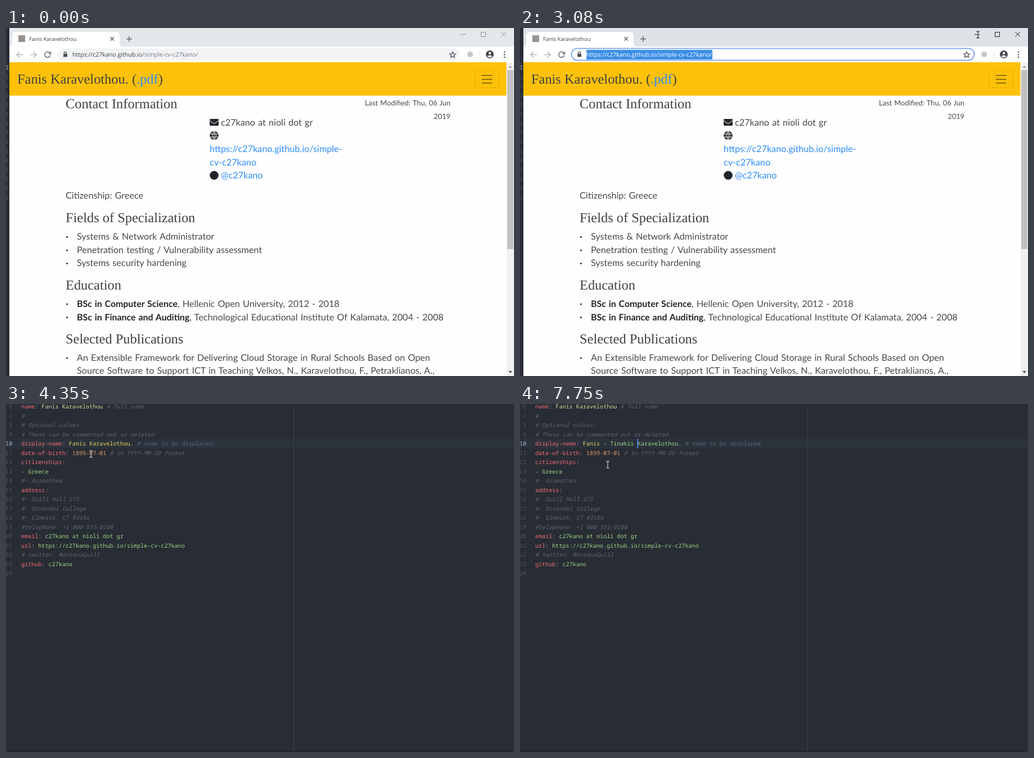
Animation, 903 px wide and 620 px high, one loop 8000 ms. Source, as an HTML page:

```html
<!DOCTYPE html>
<html lang="en">
<head>
<meta charset="utf-8">
<title>Editing a CV</title>
<style>
html, body { margin: 0; width: 100%; height: 100%; overflow: hidden; background: #282c34; }
svg { display: block; width: 903px; height: 620px; }
text { white-space: pre; text-rendering: geometricPrecision; }
.mono { font: 10.1px "Noto Sans Mono", "DejaVu Sans Mono", monospace; fill: #abb2bf; }
.num { fill: #4b5263; text-anchor: end; }
.num.on { fill: #a5acba; }
.key { fill: #f26a72; }
.str { fill: #98d67f; }
.pale { fill: #d9dd9c; }
.gold { fill: #e0d35c; }
.date { fill: #dc9c66; }
.note { fill: #5c6370; font-style: italic; }
.item { fill: #50535a; }
.item .hit { fill: #16181c; font-weight: 700; }
.ui { font: 10.6px "Open Sans", "Noto Sans", sans-serif; fill: #3c4043; }
.body { font: 16.2px Lato, "Open Sans", sans-serif; word-spacing: 1px; fill: #45494d; }
.small { font-size: 12.8px; text-anchor: end; }
.bold { font-size: 15.9px; font-weight: 700; fill: #212529; }
.link { fill: #2f8df8; }
.head { font: 24.4px "Liberation Serif", "Noto Serif", serif; fill: #3d4145; }
.bar { fill: #e5e8eb; }
.focus .bar { fill: #dee1e6; }
.btn { stroke: #8c8f93; fill: none; }
.focus .btn { stroke: #16181c; }
.pill { fill: #f1f3f4; }
.focus .pill { fill: #fff; stroke: #86aef0; stroke-width: 2; }
.sel { display: none; fill: #3a8ee6; }
.focus .sel { display: inline; }
.path { fill: #777b80; }
.focus .url, .focus .path { fill: #fff; }
.icon { fill: none; stroke: #5f6368; stroke-width: 1.5; }
.pale-icon { stroke: #b4b7bb; }
</style>
</head>
<body>
<svg viewBox="0 0 903 620">
  <rect width="903" height="620" fill="#282c34"/>
  <rect y="62" width="903" height="17" fill="#2c323c"/>
  <path d="M511.5 0V620" stroke="#3b4048"/>
  <rect y="618" width="903" height="2" fill="#2a222e"/>
  <g id="code" class="mono"></g>
  <rect id="caret" y="62" width="1.6" height="17" fill="#528bff"/>

  <g id="win">
    <rect class="bar" x="6" width="897" height="34"/>
    <path d="M6 33Q11 33 11 28V14Q11 7 18 7H195Q202 7 202 14V28Q202 33 207 33H903V62H6Z" fill="#fff"/>
    <rect x="22" y="13" width="12" height="12" fill="#9a938d"/>
    <path class="icon" d="M185.500 16l6.500 6.500m0-6.500l-6.500 6.500M214 19.500h10m-5-5v10"/>
    <path class="btn" d="M808 11.500h9M844.500 7.500h8v8h-8zM880.500 7l8.500 8.500m0-8.500l-8.500 8.500"/>
    <path class="icon pale-icon" d="M30 47.500H19m5-5l-5 5 5 5M43 47.500h11m-5-5l5 5-5 5"/>
    <path class="icon" d="M78 44.500a5 5 0 1 0 .8 4M79.500 42v4h-4"/>
    <rect class="pill" x="91.500" y="36.500" width="716" height="21" rx="10.500"/>
    <rect x="102" y="46" width="7" height="5.500" fill="#4c5054"/>
    <path class="icon" d="M103.500 46v-1.500a2 2 0 0 1 4 0V46" stroke-width="1.200"/>
    <rect class="sel" x="118" y="39" width="224" height="17"/>
    <path class="icon" d="M794 42.500l1.500 3.400 3.600.3-2.700 2.500.8 3.600-3.200-1.900-3.200 1.900.8-3.600-2.700-2.500 3.600-.3z" stroke-width="1.200"/>
    <circle cx="825" cy="47" r="5" fill="#c4c6c9"/>
    <path d="M842.500 41v13" stroke="#dcdee1"/>
    <circle cx="860" cy="47" r="7" fill="#45494e"/>
    <circle cx="860" cy="44.700" r="2.200" fill="#fff"/>
    <path d="M855.500 50.500q4.500-4 9 0-4.500 4-9 0" fill="#fff"/>
    <path d="M886 43v.01M886 47.500v.01M886 52v.01" stroke="#4c5054" stroke-width="2.600" stroke-linecap="round"/>

    <rect x="6" y="61" width="897" height="559" fill="#fefefe"/>
    <rect x="6" y="61" width="883.500" height="59.500" fill="#ffc107"/>
    <rect x="833.500" y="76" width="43" height="30.500" rx="4" fill="none" stroke="#e6ae06"/>
    <path d="M845.500 84.500H864.500M845.500 91.500H864.500M845.500 98H864.500" stroke="#6b5411" stroke-width="1.400"/>
    <rect x="890" y="62" width="13" height="558" fill="#f1f1f1"/>
    <rect x="891" y="75" width="11" height="319" fill="#c1c1c1"/>
    <path d="M893 71l3.500-4 3.500 4z" fill="#a3a3a3"/>
    <path d="M893 611l3.500 4 3.500-4z" fill="#505050"/>
    <rect x="362" y="162" width="16" height="12" rx="1.500" fill="#212529"/>
    <path d="M362 165l8 5.500 8-5.500" fill="none" stroke="#fefefe"/>
    <circle cx="370" cy="191.500" r="7.800" fill="#212529"/>
    <path d="M362 188.800h16M362 194.200h16M370 183.500v16M370 183.500q-7 8 0 16M370 183.500q7 8 0 16" fill="none" stroke="#fefefe" stroke-width=".9"/>
    <circle cx="370" cy="262.500" r="7.800" fill="#212529"/>
    <g id="page"></g>
  </g>

  <path id="arrow" d="M0 0V12.500L3 10 5 14.500 7 13.600 5 9.300H9Z" fill="#fff" stroke="#222" stroke-width=".9"/>
  <path id="beam" d="M-3-6H-1L0-5 1-6H3M0-5V5M-3 6H-1L0 5 1 6H3" fill="none" stroke="#fff" stroke-width="1.200" style="mix-blend-mode:difference"/>

  <g id="popup" class="mono">
    <rect id="list" x="153" y="79" width="192" rx="2" fill="#dfe1e5"/>
    <path d="M155 79H343q2 0 2 2V101H153V81q0-2 2-2" fill="#c5c9d1"/>
  </g>
</svg>
<script>
const $ = id => document.getElementById(id);
const show = (node, on) => node.style.display = on ? "" : "none";

function add(parent, tag, cls, attrs = {}, content = "") {
  const node = document.createElementNS("http://www.w3.org/2000/svg", tag);
  node.setAttribute("class", cls);
  for (const name in attrs) node.setAttribute(name, attrs[name]);
  node.textContent = content;
  parent.append(node);
  return node;
}

// Runs are [class, text] pairs set one after another.
function write(parent, cls, x, y, ...runs) {
  const line = add(parent, "text", cls, { x, y });
  return runs.map(([c, s]) => add(line, "tspan", c, {}, s));
}

/* Editor */
const name = "Fanis Karavelothou", user = "c27kano";
const site = `https://${user}.github.io/simple-cv-${user}`;
const field = (key, cls, value, note = "") =>
  [["key", key], ["", ": "], [cls, value], ["note", note]];
const note = s => [["note", s]];
const lines = [
  field("name", "pale", name, " # full name"),
  note("#"),
  note("# Optional values:"),
  note("# These can be commented out or deleted."),
  [["key", "display-name"], ["", ": "], ["gold", "Fanis "], ["str", ""],
    ["gold", "Karavelothou."], ["note", " # name to be displayed."]],
  field("date-of-birth", "date", "1899-07-01", " # in YYYY-MM-DD format"),
  field("citizenships", "", ""),
  [["", "- "], ["str", "Greece"]],
  note("#- Aramathea"),
  field("address", "", ""),
  note("#- Quill Hall 275"),
  note("#- Orvendel College"),
  note("#- Elmwick, CT 0318x"),
  note("#telephone: +1 000 555-0100"),
  field("email", "str", user + " at nioli dot gr"),
  field("url", "str", site),
  note("# twitter: MontanaQuill"),
  field("github", "str", user),
  []
];
const rows = lines.map((runs, i) => {
  const y = 8 + i * 16.52;
  write($("code"), i == 4 ? "num on" : "num", 11.3, y, ["", i + 6]);
  return write($("code"), "", 27, y, ...runs);
});
const typedRun = rows[4][3], restRun = rows[4][4];

const suggestions = ["information", "Optional"].map((word, i) => {
  const left = { i: 1, o: 1, a: 1 };
  const runs = [...word].map(c => [left[c]-- > 0 ? "hit" : "", c]);
  return write($("popup"), "item", 160, 93 + 22 * i, ...runs)[0].parentNode;
});

/* Browser page */
const page = $("page");
const put = (cls, x, y, s) => write(page, cls, x, y, ["", s]);
put("ui", 41, 23, name)[0].style.fontSize = "9.5px";
write(page, "ui", 118, 51, ["url", `https://${user}.github.io`], ["path", `/simple-cv-${user}/`]);
write(page, "head", 20, 99, ["", name + ". ("], ["link", ".pdf"], ["", ")"]);

for (const [y, s] of [[143, "Contact Information"], [346, "Fields of Specialization"],
  [466, "Education"], [562, "Selected Publications"]]) put("head", 106, y, s);

put("body small", 790, 138, "Last Modified: Thu, 06 Jun");
put("body small", 790, 162, "2019");
put("body", 382, 174, user + " at nioli dot gr");
put("body link", 362, 221, `https://${user}.github.io/simple-`);
put("body link", 362, 245, "cv-" + user);
put("body link", 382, 268, "@" + user);
put("body", 106, 304, "Citizenship: Greece");

for (const [y, s] of [[377, "Systems & Network Administrator"],
  [400.500, "Penetration testing / Vulnerability assessment"],
  [424, "Systems security hardening"],
  [592.500, "An Extensible Framework for Delivering Cloud Storage in Rural Schools Based on Open"],
  [616, "Source Software to Support ICT in Teaching Velkos, N., Karavelothou, F., Petraklianos, A.,"]
]) put("body", 126, y, s);
for (const [y, degree, rest] of [
  [497, "BSc in Computer Science", ", Hellenic Open University, 2012 - 2018"],
  [520.500, "BSc in Finance and Auditing", ", Technological Educational Institute Of Kalamata, 2004 - 2008"]
]) write(page, "body", 126, y, ["bold", degree], ["", rest]);
for (const y of [372.500, 396, 419.500, 492, 515.500, 588])
  add(page, "circle", "", { cx: 108.500, cy: y, r: 1.5, fill: "#212529" });

/* Motion: [time, x, y] */
const arrowPath = [[450, 794, 577], [600, 783, 524], [800, 783, 524], [900, 778, 470],
  [1050, 790, 350], [1190, 829, 215], [1300, 823, 193], [1660, 823, 193],
  [1800, 820, 125], [1960, 804, 35], [2090, 811, 11]];
const beamPath = [[3400, 814, 12], [3600, 660, 110], [3760, 400, 260], [3870, 220, 321],
  [3960, 135, 270], [4080, 130, 150], [4190, 151, 72], [4350, 151, 89], [4450, 151, 89],
  [4570, 153, 89], [7480, 153, 89], [7750, 156, 108]];
const typed = "- Tinakis ";
const keyTimes = [5050, 5270, 5590, 5750, 5970, 6060, 6210, 6310, 6470, 7050];
const within = (t, a, b) => t >= a && t < b;

function move(node, path, t) {
  const i = path.findIndex(p => p[0] > t);
  const b = path.at(i), a = i > 0 ? path[i - 1] : b;
  const k = a === b ? 0 : (t - a[0]) / (b[0] - a[0]);
  node.setAttribute("transform",
    `translate(${a[1] + (b[1] - a[1]) * k} ${a[2] + (b[2] - a[2]) * k})`);
}

function draw(t) {
  const win = $("win"), leaving = t >= 3190;
  win.setAttribute("class", t >= 2470 ? "focus" : "");
  win.setAttribute("transform", leaving ? "translate(-13.6 122.2) scale(.8435)" : "");
  win.setAttribute("opacity", leaving ? .71 : 1);
  show(win, t < 3260);

  show($("arrow"), within(t, 450, 3080));
  move($("arrow"), arrowPath, t);
  show($("beam"), t >= 3080);
  move($("beam"), beamPath, t);

  const count = keyTimes.filter(k => k <= t).length;
  typedRun.textContent = typed.slice(0, count);
  restRun.setAttribute("class", count ? "str" : "gold");
  $("caret").setAttribute("x", 147.800 + 6.06 * count);
  show($("caret"), t >= 4730 && !within(t, 6840, 7050) && !within(t, 7370, 7750));

  show($("popup"), within(t, 5970, 6210));
  $("list").setAttribute("height", t < 6060 ? 44 : 22);
  show(suggestions[1], t < 6060);
}

const start = performance.now();
function tick() {
  draw((performance.now() - start) % 8000);
  requestAnimationFrame(tick);
}
tick();
</script>
</body>
</html>
```
